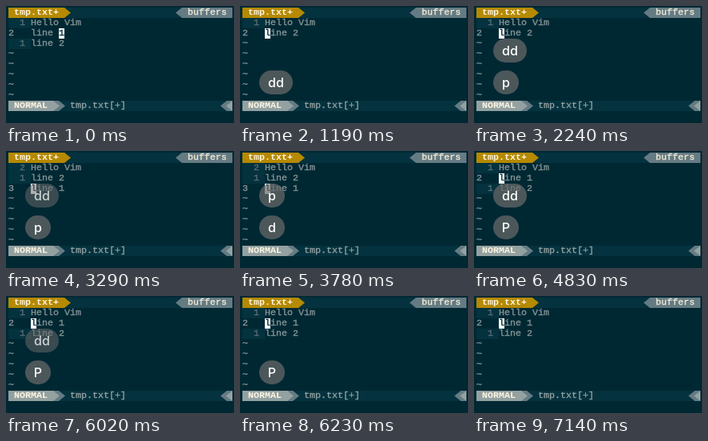
Animation of 285 by 147 pixels, one loop 7.35 s. Source, as an HTML page with a canvas:

```html
<!DOCTYPE html>
<html lang="en">
<head>
<meta charset="utf-8">
<title>Vim: moving lines with dd, p and P</title>
<style>
html, body { margin: 0; width: 100%; height: 100%; overflow: hidden; background: #002833; }
canvas { display: block; }
</style>
</head>
<body>
<canvas id="stage" width="285" height="147"></canvas>
<script>
const ctx = document.getElementById('stage').getContext('2d');
const LOOP = 7350, TICK = 70;
const CELL = 7, ROW = 13, LEFT = 3, TOP = 2, COLS = 40;
const MONO = '11.67px "Liberation Mono", monospace';
const KEYS = '500 16px Inter, sans-serif';
const C = {
  bg: '#002833', bar: '#04323e', text: '#839496', number: '#586e75',
  tab: '#b58900', mid: '#657b83', light: '#93a1a1', white: '#fdf6e3'
};

// Buffer states: start time, lines, cursor line and column.
const edits = [
  { at: 0, lines: ['Hello Vim', 'line 1', 'line 2'], line: 1, col: 5 },
  { at: 1190, lines: ['Hello Vim', 'line 2'], line: 1, col: 0 },
  { at: 2310, lines: ['Hello Vim', 'line 2', 'line 1'], line: 2, col: 0 },
  { at: 3990, lines: ['Hello Vim', 'line 2'], line: 1, col: 0 },
  { at: 4830, lines: ['Hello Vim', 'line 1', 'line 2'], line: 1, col: 0 }
];

// Key bubbles: first key, second key, pushed up, start of fade.
const bubbles = [
  { key: 'd', at: 980, again: 1190, up: 2240, fade: 3290 },
  { key: 'p', at: 2240, up: 3710, fade: 4340 },
  { key: 'd', at: 3780, again: 3920, up: 4830, fade: 6020 },
  { key: 'P', at: 4830, fade: 6930 }
];

const colX = col => LEFT + col * CELL;
const rowY = row => TOP + row * ROW;

function cells(col, row, count, color) {
  ctx.fillStyle = color;
  ctx.fillRect(colX(col), rowY(row), count * CELL, ROW);
}

// A thin outline gives regular text its slightly heavy weight.
function write(str, col, row, color, bold) {
  const x = colX(col), y = rowY(row) + 9;
  ctx.font = (bold ? 'bold ' : '') + MONO;
  ctx.textAlign = 'left';
  ctx.fillStyle = ctx.strokeStyle = color;
  ctx.lineWidth = 0.35;
  ctx.fillText(str, x, y);
  if (!bold) ctx.strokeText(str, x, y);
}

function arrow(col, row, color, dir) {
  const base = colX(dir > 0 ? col : col + 1), y = rowY(row);
  ctx.fillStyle = color;
  ctx.beginPath();
  ctx.moveTo(base, y);
  ctx.lineTo(base + dir * (CELL + 1), y + ROW / 2);
  ctx.lineTo(base, y + ROW);
  ctx.fill();
}

function drawBars() {
  cells(0, 0, COLS, C.bar);
  cells(0, 0, 10, C.tab);
  arrow(10, 0, C.tab, 1);
  write('tmp.txt+', 1, 0, C.white, true);
  arrow(30, 0, C.mid, -1);
  cells(31, 0, 9, C.mid);
  write('buffers', 32, 0, '#eee8d5');

  cells(0, 9, COLS, C.bar);
  cells(0, 9, 8, C.light);
  cells(8, 9, 1, C.mid);
  arrow(9, 9, C.mid, 1);
  arrow(8, 9, C.light, 1);
  write('NORMAL', 1, 9, C.white, true);
  write('tmp.txt[+]', 11, 9, C.light);
  arrow(38, 9, C.mid, -1);
  cells(39, 9, 1, C.mid);
  arrow(39, 9, C.light, -1);
}

function drawBuffer({ lines, line, col }) {
  lines.forEach((str, i) => {
    const row = i + 1, current = i === line;
    if (!current) cells(0, row, 4, C.bar);
    if (current) write(String(row), 0, row, C.text);
    else write(String(Math.abs(i - line)), 2, row, C.number);
    write(str, 4, row, C.text);
    if (current) {
      cells(4 + col, row, 1, '#fff');
      write(str[col], 4 + col, row, C.bg);
    }
  });
  for (let row = lines.length + 1; row < 9; row++) write('~', 0, row, C.text);
}

function drawBubble(b, t) {
  if (t < b.at) return;
  const alpha = t < b.fade ? 1 : 1 - (Math.floor((t - b.fade) / TICK) + 1) / 4;
  if (alpha <= 0) return;
  const label = t >= b.again ? b.key + b.key : b.key;
  const width = label.length > 1 ? 42 : 32;
  const y = t >= b.up ? 41 : 81;
  ctx.globalAlpha = alpha;
  ctx.fillStyle = 'rgba(106, 106, 106, 0.72)';
  ctx.beginPath();
  ctx.roundRect(24, y, width, 30, 15);
  ctx.fill();
  ctx.font = KEYS;
  ctx.textAlign = 'center';
  ctx.fillStyle = '#fff';
  ctx.fillText(label, 24 + width / 2, y + 21);
  ctx.globalAlpha = 1;
}

function draw(t) {
  ctx.fillStyle = C.bg;
  ctx.fillRect(0, 0, 285, 147);
  drawBars();
  drawBuffer(edits.filter(e => e.at <= t).pop());
  bubbles.forEach(b => drawBubble(b, t));
}

const start = performance.now();
function frame() {
  draw((performance.now() - start) % LOOP);
  requestAnimationFrame(frame);
}
frame();
</script>
</body>
</html>
```
